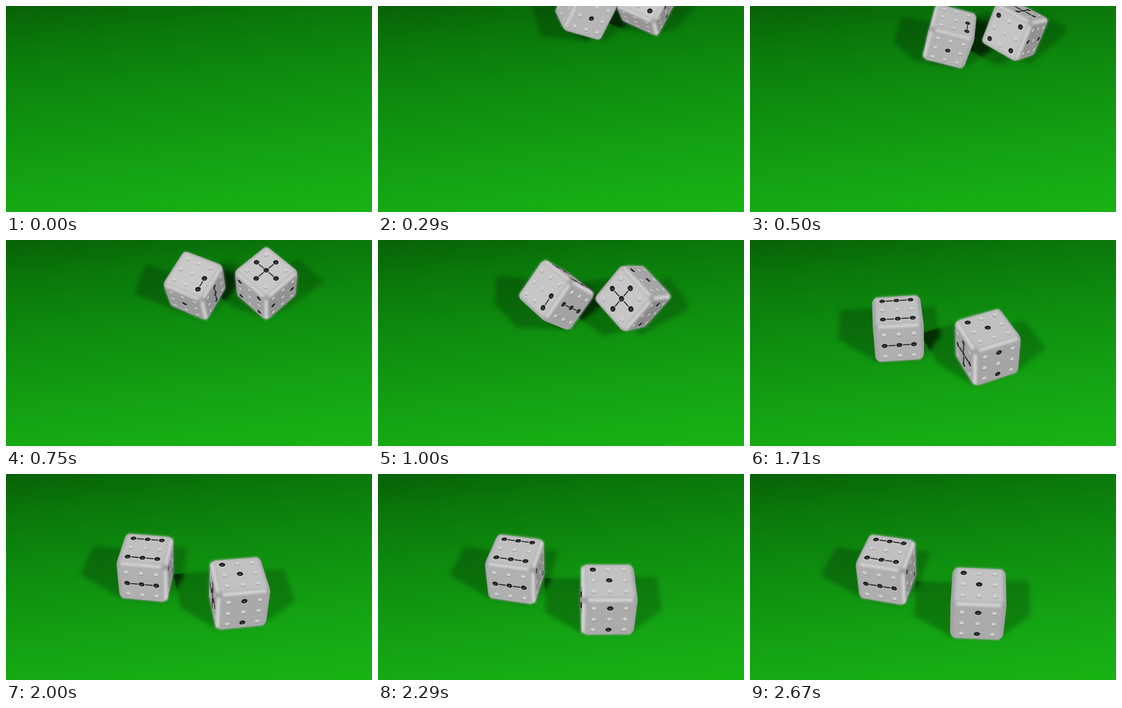
Recreate the animation shown at these times as an HTML page with a canvas. Size 700 by 394 pixels, loop 2.75 s.

```html
<!DOCTYPE html>
<html lang="en">
<head>
<meta charset="utf-8">
<title>Rolling dice</title>
<style>
  html, body { margin: 0; height: 100%; overflow: hidden; background: #129a12; }
  canvas { display: block; }
</style>
</head>
<body>
<canvas id="stage" width="700" height="394"></canvas>
<script>
const ctx = document.getElementById('stage').getContext('2d');
const LOOP = 2750, FRAMES = 66, LAST = 64, FIRST = 2;
// Lengths on a die are in units of the pip spacing.
const HALF = 1.74, ROUND = 0.42, EYE = 32, UP = [0, -0.69, -0.72];

const dot = (a, b) => a.reduce((sum, v, i) => sum + v * b[i], 0);
const unit = a => a.map(v => v / Math.sqrt(dot(a, a)));
const cross = (a, b) => [0, 1, 2].map(i => a[(i + 1) % 3] * b[(i + 2) % 3] - a[(i + 2) % 3] * b[(i + 1) % 3]);

// Key: frame, centre, then the screen vectors of the die's right, down and back axes.
// Faces: black pips (0-8) on left, right, top, bottom, front, back.
const dice = [
  makeDie([415, -85], ['12', '08', '036258', '4', '345', ''], [
    [12, 382.5, 58, -6, 17.5, -2.5, 15.5, -24, -7],
    [24, 341, 106, 15, 6.5, -15.3, 23, -16.5, -13],
    [32, 313, 145.7, 25.5, -4.7, -2.5, 22, -11.5, -15],
    [41, 283, 169.2, 28.2, -2, 1, 20.7, -1.5, -18],
    [48, 268, 179, 28.2, 1.8, 1.2, 20.8, 5, -18.3],
    [64, 262, 182.5, 27.6, 4.1, 1.5, 20.5, 8, -18]
  ]),
  makeDie([522, -90], ['13457', '', '24', '0268', '17', ''], [
    [12, 507, 47, -8.8, 23.5, -11, 3.5, -20, -10],
    [24, 488, 110, 12.5, -1.5, -16.5, 20, -17.5, -19.5],
    [32, 474, 156.7, 20.5, -14.8, -2.5, 15.5, -20, -17.5],
    [41, 453.5, 204.5, 26.6, -8.5, -0.7, 21, -12.5, -18],
    [48, 444.5, 228, 29.7, -3, -1.8, 21, -5.5, -20.5],
    [64, 436, 248, 30.7, 1, -1.3, 21, 0.5, -22]
  ])
];

// Each key becomes centre, size and a rotation quaternion.
function makeDie(start, faces, rows) {
  const keys = rows.map(([t, cx, cy, ...axes]) => {
    const gx = [axes[0], axes[2], axes[4]], gy = [axes[1], axes[3], axes[5]];
    const size = (Math.hypot(...gx) + Math.hypot(...gy)) / 2.08;
    const x = unit(gx), along = dot(x, gy);
    const y = unit(gy.map((v, i) => v - along * x[i])), z = cross(x, y);
    const w = Math.sqrt(1 + x[0] + y[1] + z[2]) / 2;
    const q = [w, (z[1] - y[2]) / 4 / w, (x[2] - z[0]) / 4 / w, (y[0] - x[1]) / 4 / w];
    return { t, v: [cx, cy, size, ...q] };
  });
  // The throw starts off stage, with the first turn carried backwards.
  const a = keys[0].v.slice(3), b = keys[1].v.slice(3), k = 2 * dot(a, b);
  keys.unshift({ t: 0, v: [...start, keys[0].v[2], ...a.map((v, i) => k * v - b[i])] });
  return { faces, keys };
}

function tangent(keys, i, c) {
  if (i === keys.length - 1) return 0;
  const a = keys[Math.max(i - 1, 0)], b = keys[i + 1];
  return (b.v[c] - a.v[c]) / (b.t - a.t);
}

function poseAt({ keys, faces }, n) {
  let i = 0;
  while (i < keys.length - 2 && keys[i + 1].t <= n) i++;
  const a = keys[i], b = keys[i + 1], h = b.t - a.t, u = (n - a.t) / h, ease = u * u * (3 - 2 * u);
  const v = a.v.map((from, c) => from + (b.v[c] - from) * ease
    + h * u * (1 - u) * ((1 - u) * tangent(keys, i, c) - u * tangent(keys, i + 1, c)));
  const [w, x, y, z] = unit(v.slice(3)), [cx, cy, size] = v;
  const m = [
    [1 - 2 * (y * y + z * z), 2 * (x * y - w * z), 2 * (x * z + w * y)],
    [2 * (x * y + w * z), 1 - 2 * (x * x + z * z), 2 * (y * z - w * x)],
    [2 * (x * z - w * y), 2 * (y * z + w * x), 1 - 2 * (x * x + y * y)]
  ];
  const turn = p => m.map(row => dot(row, p));
  const project = p => {
    const c = turn(p), f = size * EYE / (EYE + c[2]);
    return [cx + c[0] * f, cy + c[1] * f];
  };
  return { faces, cx, size, turn, project };
}

const corners = r => Array.from({ length: 8 }, (_, i) => [i & 1, i >> 1 & 1, i >> 2].map(b => b ? r : -r));

function hull(points) {
  const sorted = [...points].sort((a, b) => a[0] - b[0] || a[1] - b[1]);
  const chain = list => {
    const out = [];
    for (const p of list) {
      while (out.length > 1) {
        const [a, b] = out.slice(-2);
        if ((b[0] - a[0]) * (p[1] - a[1]) - (b[1] - a[1]) * (p[0] - a[0]) > 0) break;
        out.pop();
      }
      out.push(p);
    }
    return out.slice(0, -1);
  };
  return [...chain(sorted), ...chain(sorted.reverse())];
}

function addPolygon(path, points) {
  points.forEach(([x, y], i) => i ? path.lineTo(x, y) : path.moveTo(x, y));
  path.closePath();
  return path;
}
const polygon = points => addPolygon(new Path2D(), points);

function fill(path, color) {
  ctx.fillStyle = color;
  ctx.fill(path);
}

function stroke(points, color, width) {
  ctx.strokeStyle = color;
  ctx.lineWidth = width;
  ctx.beginPath();
  points.forEach(p => ctx.lineTo(...p));
  ctx.stroke();
}

function drawTable() {
  const g = ctx.createLinearGradient(0, 0, 56, 471);
  ['#086207', '#0a770a', '#0d860d', '#109310', '#139f12', '#16aa14', '#18b314']
    .forEach((c, i) => g.addColorStop(i / 6, c));
  ctx.fillStyle = g;
  ctx.fillRect(0, 0, 700, 394);
}

// One shadow per lamp; where both lamps are blocked the table is much darker.
function drawShadows(poses) {
  const cast = slope => {
    const path = new Path2D();
    for (const pose of poses) {
      const [dx, dy] = slope(pose.cx), points = corners(HALF - 0.2);
      const heights = points.map(p => dot(pose.turn(p), UP)), floor = Math.min(...heights);
      addPolygon(path, hull(points.map((p, i) => {
        const [x, y] = pose.project(p), k = (heights[i] - floor) * pose.size / 30;
        return [x + dx * k, y + dy * k];
      })));
    }
    return path;
  };
  const left = cast(() => [-24, 7.3]);
  const right = cast(x => [11 + (x - 262) * 0.032, 6.5]);
  ctx.save();
  ctx.filter = 'blur(4px)';
  fill(left, 'rgba(0,25,0,.27)');
  fill(right, 'rgba(0,25,0,.23)');
  ctx.clip(left);
  fill(right, 'rgba(0,15,0,.58)');
  ctx.restore();
}

function drawDie({ faces, size, turn, project }) {
  const at = (axis, side, u, v) => {
    const p = [];
    p[axis] = side;
    p[(axis + 1) % 3] = u;
    p[(axis + 2) % 3] = v;
    return project(p);
  };
  const visible = faces.map((marks, i) => {
    const axis = i >> 1, sign = i % 2 ? 1 : -1;
    const normal = turn([0, 1, 2].map(a => a === axis ? sign : 0));
    return { marks, axis, sign, normal };
  }).filter(f => f.normal[2] < -HALF / EYE);

  const body = hull(corners(HALF - ROUND).map(project));
  ctx.lineJoin = ctx.lineCap = 'round';
  fill(polygon(body), '#a2a2a3');
  stroke([...body, body[0], body[1]], '#a2a2a3', 2 * ROUND * size);

  ctx.save();
  ctx.filter = 'blur(2.5px)';
  for (const { axis, sign, normal } of visible) {
    const e = HALF - 0.24, tone = Math.round(255 * (0.54 - dot(normal, [0.04, 0.06, 0.25])));
    const quad = [[-e, -e], [e, -e], [e, e], [-e, e]].map(([u, v]) => at(axis, sign * (HALF - 0.02), u, v));
    fill(polygon(quad), `rgb(${tone},${tone},${tone + 1})`);
  }
  for (const a of visible) for (const b of visible) {
    if (b.axis !== (a.axis + 1) % 3) continue;
    const e = HALF - 0.1;
    const ends = [-1.3, 1.3].map(v => at(a.axis, a.sign * e, b.sign * e, v));
    stroke(ends, 'rgba(240,240,242,.8)', 0.2 * size);
  }
  ctx.restore();

  for (const { marks, axis, sign } of visible) {
    const point = (u, v) => at(axis, sign * HALF, u, v);
    const place = k => [k % 3 - 1, Math.floor(k / 3) - 1];
    const disc = (k, r, color, shift = 0) => {
      const [u, v] = place(k);
      fill(polygon(Array.from({ length: 16 }, (_, i) => {
        const [x, y] = point(u + r * Math.cos(i * Math.PI / 8), v + r * Math.sin(i * Math.PI / 8));
        return [x, y + shift];
      })), color);
    };
    const link = (k, next) => {
      if (!marks.includes(next)) return;
      const [a, b] = [place(k), place(next)];
      stroke([0.28, 0.72].map(t => point(a[0] + (b[0] - a[0]) * t, a[1] + (b[1] - a[1]) * t)), '#2b2b2b', 0.075 * size);
    };
    for (let k = 0; k < 9; k++) {
      if (marks.includes(k)) {
        disc(k, 0.21, '#d6d6d7', 1);
        disc(k, 0.2, '#1c1c1c');
        disc(k, 0.11, '#3c3c3c', 1);
        if (k % 3 < 2) link(k, k + 1);
        if (k < 6) link(k, k + 3);
      } else {
        disc(k, 0.16, 'rgba(110,110,110,.55)', 0.8);
        disc(k, 0.15, 'rgba(218,218,220,.85)', -0.2);
      }
    }
  }
}

function draw(now) {
  const n = Math.min(LAST, Math.floor(now % LOOP * FRAMES / LOOP + 0.15));
  drawTable();
  if (n >= FIRST) {
    const poses = dice.map(die => poseAt(die, n));
    drawShadows(poses);
    poses.forEach(drawDie);
  }
  requestAnimationFrame(() => draw(performance.now() - began));
}
const began = performance.now();
draw(0);
</script>
</body>
</html>
```
